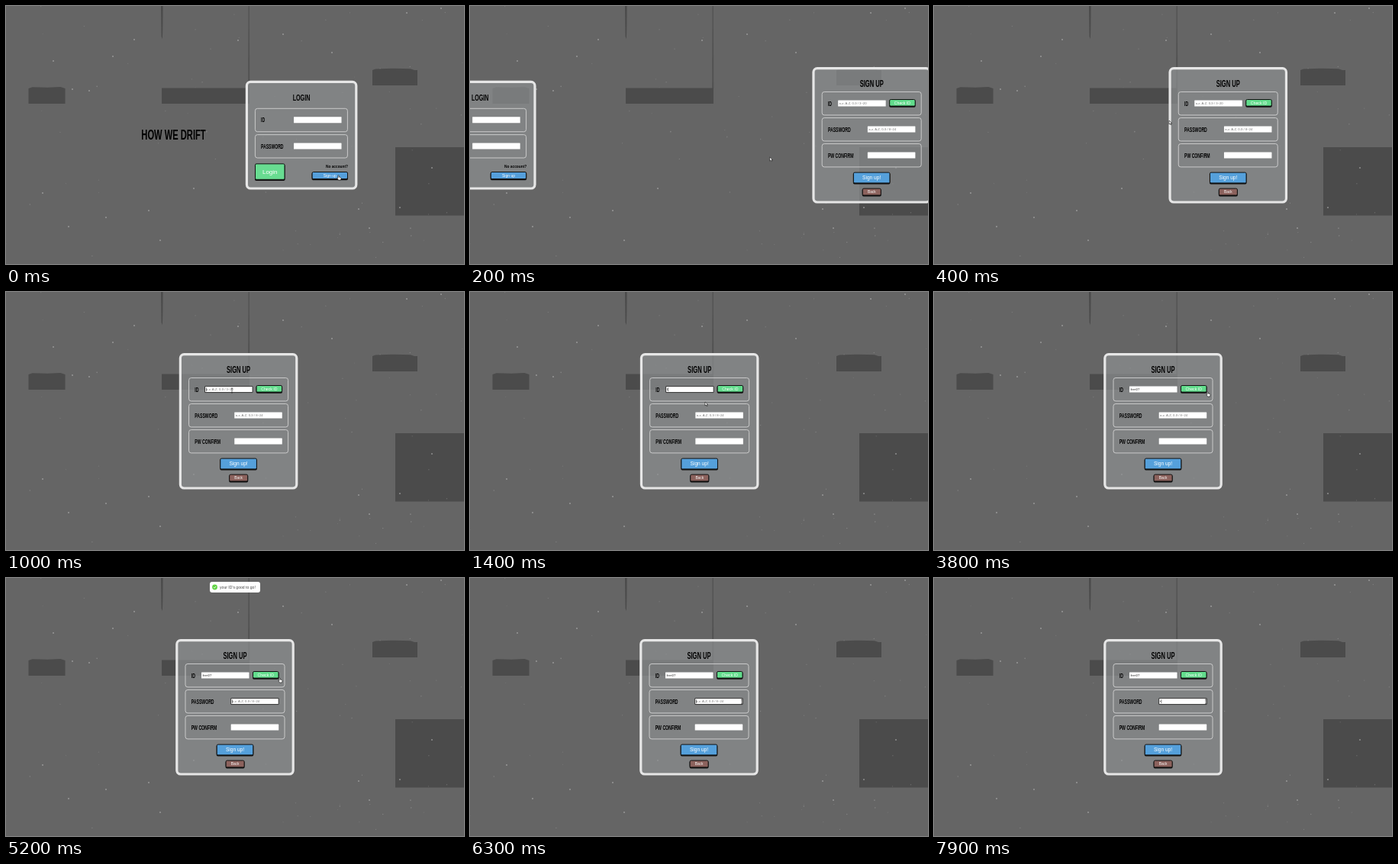
Animation of 600 by 338 pixels, one loop 8000 ms. Source, as an HTML page:

```html
<!DOCTYPE html>
<html lang="en">
<head>
<meta charset="utf-8">
<title>Sign up form</title>
<style>
html, body { margin: 0; width: 100%; height: 100%; overflow: hidden; background: #656565; }
svg { display: block; width: 600px; height: 338px; }
text { font-family: "Liberation Sans", Arial, sans-serif; white-space: pre; }
.head { font-weight: bold; }
.shade { fill: #4b4b4b; }
.panel { fill: rgba(142, 144, 146, .7); stroke: #e6e6e6; stroke-width: 3.2; }
.row { fill: none; stroke: #d2d2d2; stroke-width: .9; }
.hint { fill: #757575; }
.btn { stroke: #111; stroke-width: 1; }
.cursor { fill: #fff; stroke: #111; stroke-width: .6; stroke-linejoin: round; }
</style>
</head>
<body>
<svg id="stage" viewBox="0 0 600 338">
  <rect width="600" height="338" fill="#656565"/>
  <g class="shade">
    <path d="M203 0h2.6l-.2 24-.5 19-1.3-3z"/>
    <path d="M317.6 0h1.2l.4 108h-2z" opacity=".75"/>
    <path d="M204 107.5H319V128H204z"/>
    <path d="M29.500 108l5-1.800 20 .5 17-.8 6 2.100V128h-48z"/>
    <path d="M480 84l4-1.500 22-.8 24 .6 5 1.700h4V104h-59z"/>
    <path d="M510 185h90v89.500h-90z"/>
  </g>
  <g id="dust" fill="#b4b4b4"></g>
  <g id="login"></g>
  <g id="signup"></g>
  <g id="toast">
    <rect x="-33" y="-7" width="66" height="14" rx="3" fill="#fff"/>
    <g id="tick">
      <circle r="3.400" fill="#61d345"/>
      <path id="check" d="M-1.500 .1l1.100 1.200 2-2.500" fill="none" stroke="#fff" stroke-width=".8" pathLength="1" stroke-dasharray="1"/>
    </g>
    <text x="-20" y="1.800" font-size="5.1" fill="#464646">your ID's good to go!</text>
  </g>
  <g id="cursor">
    <path id="arrow" class="cursor" d="M0 0v5l1.200-1 .9 1.700.9-.4-.8-1.700h1.600z"/>
    <path id="hand" class="cursor" d="M0 0q.8-.6 1.200.3v1.700l2.300.6q.7.3.5 1.200l-.5 2.200H.6L-1.200 3.700q0-.8.7-.6l.5.4z"/>
    <path id="beam" d="M-1-3H1M0-3V3M-1 3H1" fill="none" stroke="#222" stroke-width=".6"/>
  </g>
</svg>
<script>
const $ = id => document.getElementById(id);
const LOOP = 8000, STEP = 100;
const USER = "fern07", KEY_TIMES = [1400, 1600, 1800, 2000, 2300, 2400], PASS_TIME = 7900;

function add(parent, tag, attrs, text) {
  const el = document.createElementNS("http://www.w3.org/2000/svg", tag);
  for (const k in attrs) el.setAttribute(k, attrs[k]);
  if (text) el.textContent = text;
  return parent.appendChild(el);
}
const box = (g, x, y, width, height, rx, attrs) => add(g, "rect", { x, y, width, height, rx, ...attrs });

// Headings share one condensed face.
const head = (g, x, y, size, text, anchor = "start") => add(g, "text", {
  class: "head", "font-size": size, "text-anchor": anchor,
  transform: `translate(${x} ${y}) scale(.62 1)`
}, text);

function button(g, x, y, w, h, fill, size, label) {
  box(g, x, y + 1.2, w, h, 1.8, { fill: "#111" });
  box(g, x + .5, y + .5, w - 1, h - 1, 1.6, { class: "btn", fill });
  add(g, "text", { x: x + w / 2, y: y + h / 2 + size * .35, "font-size": size, fill: "#fff", "text-anchor": "middle" }, label);
}

function field(g, x, y, hint) {
  const input = box(g, x, y, 62.5, 8, .3, { fill: "#fff" });
  const small = { x: x + 1.4, y: y + 5.5, "font-size": 4.2 };
  const ghost = add(g, "text", { ...small, class: "hint" }, hint);
  const value = add(g, "text", { ...small, fill: "#222" });
  const caret = box(g, 0, y + 1.6, .5, 5, 0, { fill: "#111", visibility: "hidden" });
  return function (text, focus, blink) {
    input.setAttribute("stroke", focus ? "#111" : "none");
    input.setAttribute("stroke-width", .8);
    if (value.textContent !== text) value.textContent = text;
    ghost.setAttribute("visibility", text ? "hidden" : "inherit");
    caret.setAttribute("visibility", focus && blink ? "visible" : "hidden");
    caret.setAttribute("x", x + 1.5 + (text ? value.getComputedTextLength() : 0));
  };
}

function buildDust() {
  const bright = [62, 72, 168, 44, 140, 66, 87, 109, 109, 111, 363, 37, 427, 61, 525, 9, 558, 212, 48, 245,
    131, 277, 202, 307, 246, 239, 516, 264, 462, 266, 476, 291, 304, 45, 187, 268, 82, 289, 570, 3];
  for (let i = 0; i < bright.length; i += 2)
    add($("dust"), "circle", { cx: bright[i], cy: bright[i + 1], r: 1.1, opacity: .6 });
  let seed = 7;
  const rnd = () => (seed = seed * 16807 % 2147483647) / 2147483647;
  for (let i = 0; i < 70; i++)
    add($("dust"), "circle", { cx: rnd() * 600, cy: rnd() * 338, r: .5 + rnd() * .3, opacity: .15 + rnd() * .3 });
}

function buildLogin() {
  const g = $("login");
  head(g, 219.5, 175.3, 18, "HOW WE DRIFT", "middle");
  box(g, 315.4, 99.4, 143.4, 139.6, 5, { class: "panel" });
  head(g, 387, 123.7, 11.5, "LOGIN", "middle");
  for (const [y, label] of [[134.3, "ID"], [168.6, "PASSWORD"]]) {
    box(g, 326.4, y, 121, 30.4, 3, { class: "row" });
    head(g, 334, y + 17.9, 8.2, label);
    field(g, 377, y + 11, "");
  }
  button(g, 326, 206.3, 39.5, 21.5, "#68dc91", 8, "Login");
  add(g, "text", { class: "head", x: 448, y: 211.7, "font-size": 4.8, "text-anchor": "end" }, "No account?");
  button(g, 400.6, 217, 47.4, 10, "#559fdb", 5, "Sign up");
}

function buildSignup() {
  const g = $("signup");
  box(g, 223.8, 81.6, 152.4, 175.4, 5, { class: "panel" });
  head(g, 300, 106.2, 12.2, "SIGN UP", "middle");
  const rows = [["ID", 256, "a-z, A-Z, 0-9 / 3~20"], ["PASSWORD", 294.7, "a-z, A-Z, 0-9 / 8~24"], ["PW CONFIRM", 294.7, ""]];
  const fields = rows.map(([label, x, hint], i) => {
    const y = 112.5 + i * 34;
    box(g, 235, y, 130, 30.4, 3, { class: "row" });
    head(g, 242.7, y + 18.1, 8.3, label);
    return field(g, x, y + 11.1, hint);
  });
  button(g, 323, 122, 34.5, 9.6, "#62dc8c", 5.2, "Check ID");
  button(g, 275.7, 217.6, 48.6, 14.8, "#55a0db", 6.6, "Sign up!");
  button(g, 287.6, 238.6, 25, 9.8, "#8c625d", 4.8, "Back");
  return fields;
}

const clamp = v => Math.max(0, Math.min(1, v));
const easeOut = (p, n) => 1 - (1 - clamp(p)) ** n;

// time, x, y, shape that holds until the next entry
const path = [
  [0, 435, 222, "hand"], [100, 435, 222, "arrow"], [400, 308, 150, "arrow"], [900, 296, 129, "beam"],
  [1200, 296, 129, "arrow"], [1400, 308, 144, "arrow"], [1600, 353, 222, "arrow"], [1800, 353, 222, ""],
  [3400, 384, 150, "arrow"], [3600, 358, 131, "hand"], [5600, 358, 131, "arrow"], [5900, 356, 162, "beam"],
  [LOOP, 356, 162, "beam"]
];

function drawCursor(t) {
  const i = path.findIndex(p => p[0] > t) - 1;
  const [t0, x0, y0, shape] = path[i], [t1, x1, y1] = path[i + 1];
  const moving = t1 - t0 <= 500 && shape === "arrow";
  const k = moving ? (t - t0) / (t1 - t0) : 0;
  $("cursor").setAttribute("transform", `translate(${x0 + (x1 - x0) * k} ${y0 + (y1 - y0) * k})`);
  for (const id of ["arrow", "hand", "beam"]) $(id).setAttribute("visibility", id === shape ? "visible" : "hidden");
}

function drawToast(t) {
  const age = t - 3800, inn = easeOut(age / 350, 3), out = easeOut((age - 2000) / 400, 4);
  const y = 12 - 28 * (1 - inn) - 21 * out, scale = (.6 + .4 * inn) * (1 - .4 * out);
  $("toast").setAttribute("transform", `translate(300 ${y}) scale(${scale})`);
  $("toast").setAttribute("opacity", age < 0 ? 0 : (.5 + .5 * inn) * (1 - out));
  $("tick").setAttribute("transform", `translate(-26.5 0) scale(${easeOut((age - 100) / 300, 2)})`);
  $("check").setAttribute("stroke-dashoffset", 1 - clamp((age - 300) / 200));
}

buildDust();
buildLogin();
const [idField, passField] = buildSignup();

function draw(t) {
  const off = t < 1700 ? 600 * Math.exp(-t / 205) : 0;
  $("login").setAttribute("transform", `translate(${off - 600} 0)`);
  $("signup").setAttribute("transform", `translate(${off} 0)`);
  const typed = KEY_TIMES.filter(k => k <= t).length;
  idField(USER.slice(0, typed), t >= 1000 && t < 3600, t < 2900 || t >= 3400);
  passField(t >= PASS_TIME ? "•" : "", t >= 5200, t < 5700 || (t >= 6300 && t < 6800) || t >= 7300);
  drawToast(t);
  drawCursor(t);
}

const start = performance.now();
function tick() {
  const t = (performance.now() - start) % LOOP;
  draw(Math.floor(t / STEP) * STEP);
  requestAnimationFrame(tick);
}
tick();
</script>
</body>
</html>
```
